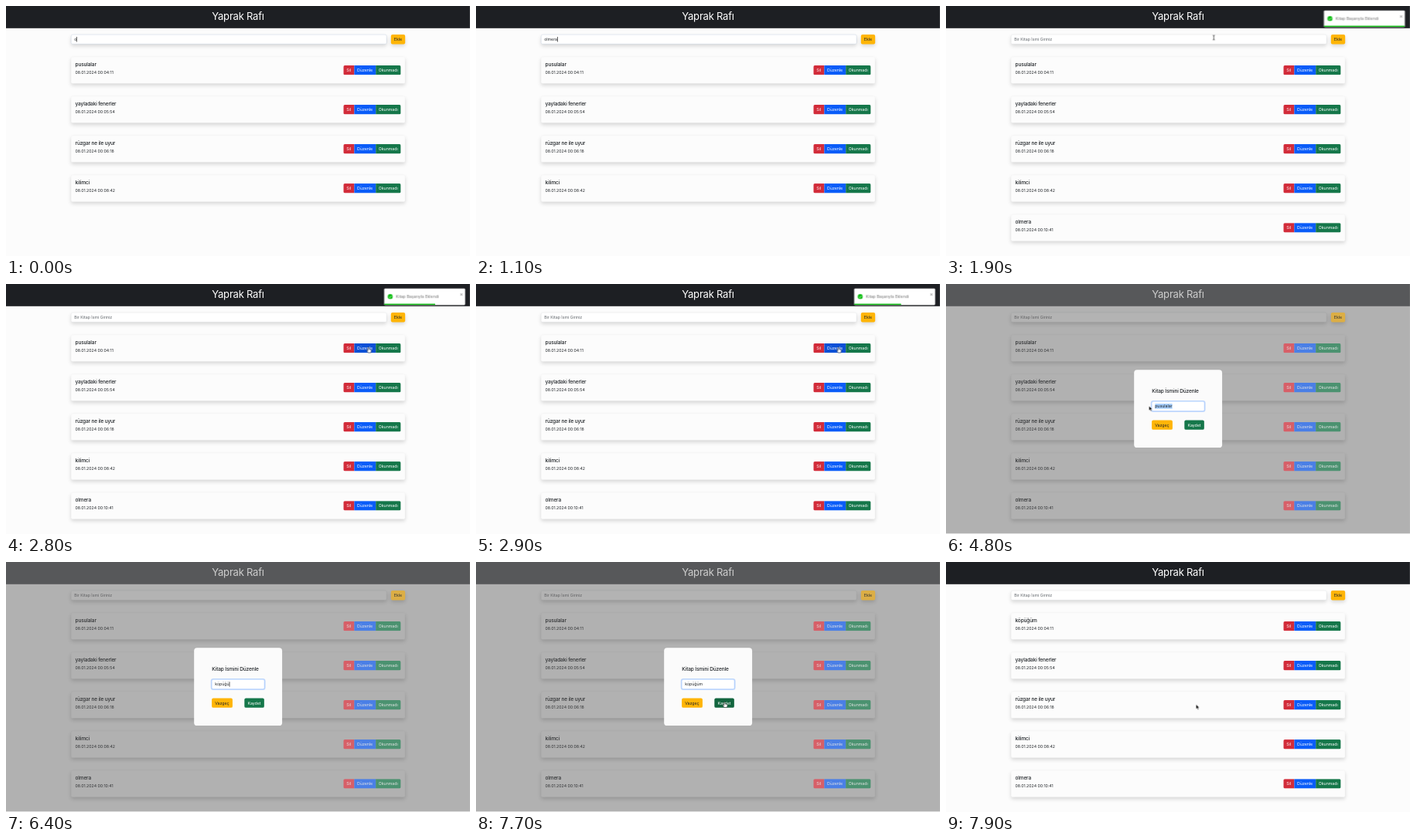
Write an HTML page that moves like this. It is 600 by 324 pixels and loops after 8 s.

```html
<!DOCTYPE html>
<html lang="tr">
<head>
<meta charset="utf-8">
<title>Yaprak Rafı</title>
<style>
  :root {
    --page: #fcfcfc; --field: #fff; --bar: #1d1f23; --title: #fff; --ink: #212529; --hint: #62676c;
    --line: #d9dcdf; --red: #d22c3a; --blue: #0a5cf8; --green: #15774a; --yellow: #ffb507; --label: #fff;
  }
  html, body { margin: 0; width: 100%; height: 100%; overflow: hidden; background: #fcfcfc; }
  * { box-sizing: border-box; }
  #stage {
    position: absolute; width: 1833.2px; height: 988px; overflow: hidden;
    transform: scale(.3273); transform-origin: 0 0;
    background: var(--page); color: var(--ink);
    font: 400 16px/24px Inter, "Noto Sans", sans-serif; letter-spacing: -.005em;
  }
  #stage.dim {
    --page: #b1b1b1; --field: #b3b3b3; --bar: #57585a; --title: #cdcdcd; --ink: #303234; --hint: #606163;
    --line: #a3a4a5; --red: #d75f68; --blue: #4a7fe6; --green: #4b9270; --yellow: #dcae45; --label: #e4e4e4;
  }
  header {
    height: 88px; background: var(--bar); color: var(--title); text-align: center;
    font-size: 40px; line-height: 82px; letter-spacing: -.02em;
  }
  .field {
    position: absolute; height: 38px; padding: 6px 12px; white-space: pre;
    border: 1px solid var(--line); border-radius: 6px; background: var(--field);
  }
  .raised { box-shadow: 0 8px 16px rgba(0, 0, 0, .15); }
  #entry { left: 256.5px; top: 113px; width: 1247px; }
  #entry.focus { border-color: #b4c3d8; }
  #entry.empty { color: var(--hint); }
  .caret::after {
    content: ""; display: inline-block; width: 2px; height: 20px; margin: 0 -2px -4px 0; background: #111;
  }
  .btn {
    display: inline-block; height: 38px; line-height: 38px; border-radius: 6px;
    text-align: center; color: var(--label); white-space: nowrap;
  }
  .yellow { background: var(--yellow); color: var(--ink); }
  .green { background: var(--green); }
  #add { position: absolute; left: 1521px; top: 113px; width: 55.5px; }
  .card {
    position: absolute; left: 256.5px; width: 1320px; height: 106px; padding: 16px;
    border: 1px solid rgba(0, 0, 0, .07); border-radius: 6px;
  }
  .name { height: 24px; margin-bottom: 8px; font-size: 20px; font-weight: 500; letter-spacing: -.025em; }
  .actions { position: absolute; right: 16px; top: 33px; display: flex; border-radius: 6px; overflow: hidden; }
  .actions .btn { border-radius: 0; }
  .actions .btn:nth-child(1) { width: 43px; background: var(--red); }
  .actions .btn:nth-child(2) { width: 85px; background: var(--blue); }
  .actions .btn:nth-child(3) { width: 99px; background: var(--green); }
  .actions .btn.hover { background: #0b50d6; }

  #modal {
    position: absolute; left: 742.5px; top: 340px; width: 348px; height: 308px; border-radius: 12px;
    display: none; background: #fbfbfb;
    --field: #fff; --ink: #212529; --line: #dee2e6; --green: #15774a; --yellow: #ffb507; --label: #fff;
    color: var(--ink);
  }
  .dim #modal { display: block; }
  #modal > * { position: absolute; }
  #modal .name { left: 71px; top: 72px; white-space: nowrap; }
  #edit { left: 70px; top: 125px; width: 208px; }
  #edit.focus { border-color: #86b7fe; box-shadow: 0 0 0 4px rgba(13, 110, 253, .25); }
  #picked { background: #a5cdfb; }
  #cancel { left: 70px; top: 199px; width: 82px; }
  #save { left: 199px; top: 199px; width: 78px; }
  #save.hover { background: #12653e; }

  #toast {
    position: absolute; left: 1494px; top: 18px; width: 320px; height: 65px; padding: 20px 0 0 46px;
    overflow: hidden; border-radius: 4px; background: #fff; color: #757575; white-space: nowrap;
    box-shadow: 0 1px 10px rgba(0, 0, 0, .1), 0 2px 15px rgba(0, 0, 0, .05);
    animation: toast 8s infinite cubic-bezier(.215, .61, .355, 1);
  }
  #toast svg { position: absolute; left: 14px; top: 22px; }
  #toast i { position: absolute; right: 8px; top: 8px; font: 20px/24px Inter, sans-serif; color: #777; }
  #toast b {
    position: absolute; left: 0; bottom: 0; width: 100%; height: 5px; background: #07bc0c;
    transform-origin: 0 0; animation: drain 8s infinite linear;
  }
  @keyframes toast {
    0%, 16.75% { transform: translateX(3000px); opacity: 0; }
    22% { transform: translateX(-25px); opacity: 1; }
    23.3% { transform: translateX(10px); }
    24.6% { transform: translateX(-5px); }
    25.5% { transform: none; }
    50.75% { transform: none; animation-timing-function: ease; }
    52.5% { transform: translateX(-20px); opacity: 1; animation-timing-function: ease; }
    59.5%, 100% { transform: translateX(2000px); opacity: 0; }
  }
  @keyframes drain {
    0%, 25.75% { transform: scaleX(1); }
    50.75%, 100% { transform: scaleX(0); }
  }

  #pointer { position: absolute; left: 0; top: 0; width: 0; height: 0; animation: roam 8s infinite ease-in-out; }
  #pointer svg { position: absolute; overflow: visible; fill: #000; stroke: #fff; stroke-width: 1.5; }
  @keyframes roam {
    0%, 26.25% { transform: translate(1058px, 125px); }
    33.75%, 37.5% { transform: translate(1432px, 256px); }
    43.75%, 46.25% { transform: translate(865px, 504px); }
    48.75% { transform: translate(912px, 484px); }
    55%, 61.25% { transform: translate(802px, 483px); }
    85% { transform: translate(815px, 490px); }
    93.75%, 96.25% { transform: translate(982px, 560px); }
    98.75%, 100% { transform: translate(988px, 564px); }
  }
</style>
</head>
<body>
<div id="stage">
  <header>Yaprak Rafı</header>
  <div id="entry" class="field raised"></div>
  <span id="add" class="btn yellow raised">Ekle</span>
  <main id="list"></main>

  <div id="modal">
    <div class="name">Kitap İsmini Düzenle</div>
    <div id="edit" class="field"><span id="plain"></span><span id="picked"></span></div>
    <span id="cancel" class="btn yellow">Vazgeç</span>
    <span id="save" class="btn green">Kaydet</span>
  </div>

  <div id="toast">
    <svg width="20" height="20" viewBox="0 0 20 20">
      <circle cx="10" cy="10" r="10" fill="#07bc0c"/>
      <path d="M5 10.5l3.5 3.5L15 7" fill="none" stroke="#fff" stroke-width="2.2"/>
    </svg>
    Kitap Başarıyla Eklendi<i>×</i><b></b>
  </div>

  <div id="pointer">
    <svg data-kind="arrow"><path d="M0 0V18L4.2 14.2L7 20.8L10.2 19.4L7.4 13H13Z"/></svg>
    <svg data-kind="beam"><path d="M-4 -9Q0 -9 0 -6V6Q0 9 -4 9M4 -9Q0 -9 0 -6M0 6Q0 9 4 9" style="fill:none;stroke:#222;stroke-width:2.2"/></svg>
    <svg data-kind="hand"><path d="M-2 -5Q0 -8 2 -5V2L10 4Q12 5 11 10L9 16H-1L-7 8Q-7 5 -4 6L-2 8Z" style="fill:#fff;stroke:#111"/></svg>
  </div>
</div>
<script>
  const $ = id => document.getElementById(id);
  const OLD_NAME = 'pusulalar', NEW_NAME = 'köpüğüm', ADDED = 'olmera';
  const books = [
    [OLD_NAME, '04:11'], ['yayladaki fenerler', '05:54'], ['rüzgar ne ile uyur', '06:18'],
    ['kilimci', '08:42'], [ADDED, '10:41']
  ];
  $('list').innerHTML = books.map(([name, time], i) => `
    <div class="card raised" style="top:${201 + i * 155.9}px">
      <div class="name">${name}</div>08.01.2024 00:${time}
      <div class="actions"><span class="btn">Sil</span><span class="btn">Düzenle</span><span class="btn">Okunmadı</span></div>
    </div>`).join('');

  const cards = [...document.querySelectorAll('.card')];
  const firstName = cards[0].querySelector('.name');
  const editButton = cards[0].querySelectorAll('.btn')[1];
  const cursors = [...document.querySelectorAll('#pointer svg')];
  const clock = $('pointer').getAnimations()[0];

  const ADD_AT = 1300, OPEN_AT = 3000, CLOSE_AT = 7700;
  const entryKeys = [0, 100, 300, 500, 800, 1000];
  const editKeys = [4900, 5200, 5400, 5600, 5900, 6200, 6600];
  const pointerKinds = [
    [0, ''], [1800, 'beam'], [2200, 'arrow'], [2600, 'hand'], [3000, 'arrow'], [3700, 'beam'],
    [4400, 'arrow'], [4900, ''], [6800, 'beam'], [7200, 'arrow'], [7400, 'hand'], [7800, 'arrow']
  ];

  const within = (t, from, to) => t >= from && t < to;
  const typed = (text, keys, t) => text.slice(0, keys.filter(k => k <= t).length);

  function draw(t) {
    const writing = t < ADD_AT;
    $('entry').textContent = writing ? typed(ADDED, entryKeys, t) : 'Bir Kitap İsmi Giriniz';
    $('entry').className = 'field raised ' + (writing ? 'focus caret' : 'empty');
    cards[4].hidden = writing;
    firstName.textContent = t < CLOSE_AT ? OLD_NAME : NEW_NAME;

    $('stage').classList.toggle('dim', within(t, OPEN_AT, CLOSE_AT));
    editButton.classList.toggle('hover', within(t, 2600, OPEN_AT));
    $('save').classList.toggle('hover', within(t, 7400, CLOSE_AT));

    const replacing = t >= editKeys[0];
    const text = replacing ? typed(NEW_NAME, editKeys, t) : OLD_NAME;
    const share = replacing ? 0 : Math.min(1, Math.max(0, (t - 3900) / 500));
    const split = Math.round(text.length * (1 - share));
    $('plain').textContent = text.slice(0, split);
    $('picked').textContent = text.slice(split);
    $('edit').classList.toggle('focus', t >= 3900);
    $('plain').classList.toggle('caret', replacing && (t < 6800 || t % 1000 < 500));

    const kind = pointerKinds.filter(([from]) => from <= t).pop()[1];
    cursors.forEach(c => { c.style.display = c.dataset.kind === kind ? '' : 'none'; });
  }

  function tick() {
    draw((clock.currentTime || 0) % 8000);
    requestAnimationFrame(tick);
  }
  tick();
</script>
</body>
</html>
```
